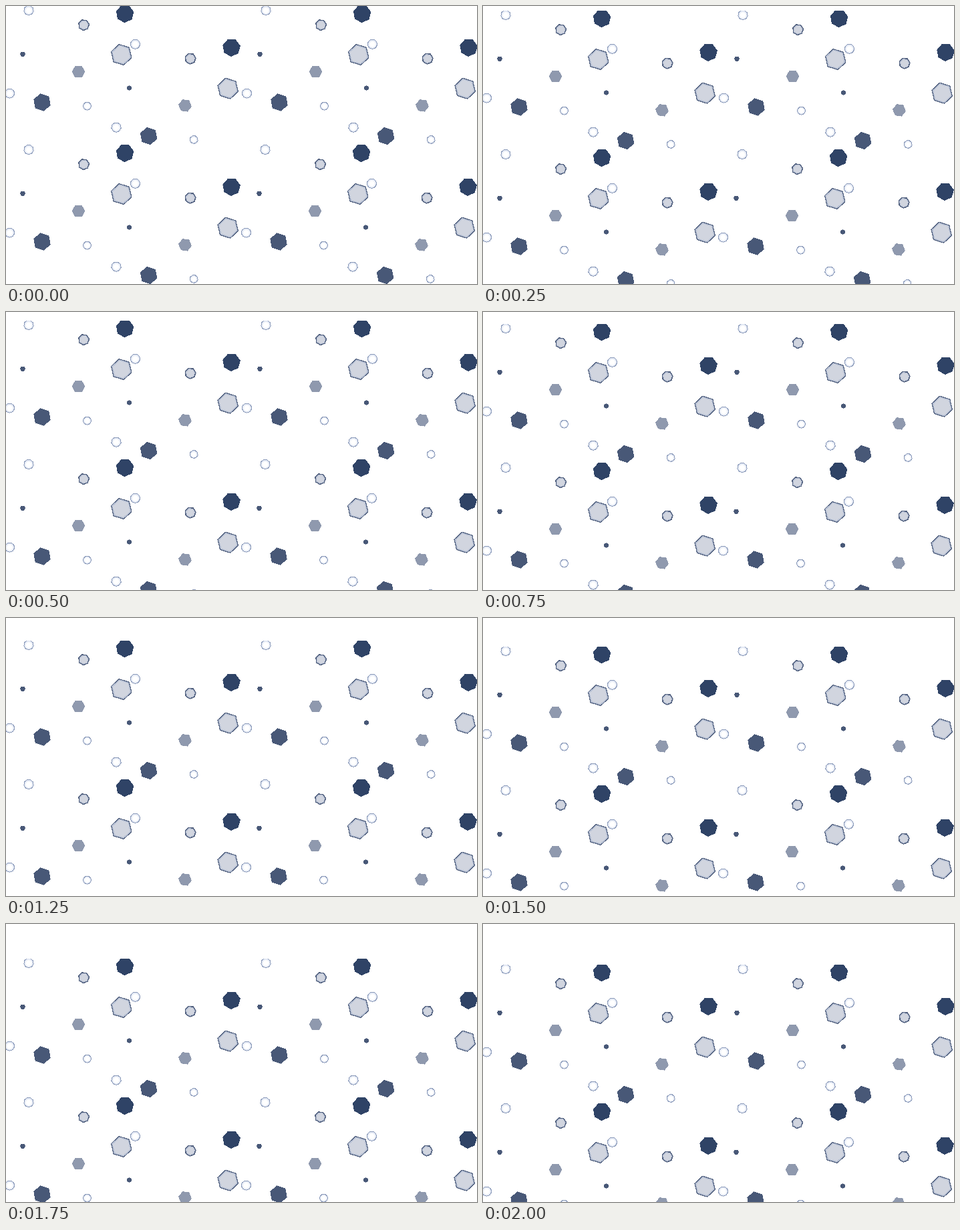
Recreate the animation shown at these times as an HTML page. Size 705 px wide and 417 px high, loop 2250 ms.

```html
<!DOCTYPE html>
<html lang="en">
<head>
<meta charset="utf-8">
<title>Falling hexagons</title>
<style>
  html, body {
    margin: 0;
    width: 100%;
    height: 100%;
    overflow: hidden;
    background: #fff;
  }
  svg {
    display: block;
    width: 100%;
    height: 100%;
    overflow: hidden;
    shape-rendering: crispEdges;
  }
  .sheet {
    clip-path: url(#edge);
    animation: fall 2250ms step-end infinite;
  }
  @keyframes fall {
    0% { transform: translateY(0); }
    11.1111% { transform: translateY(7px); }
    22.2222% { transform: translateY(13px); }
    33.3333% { transform: translateY(18px); }
    44.4444% { transform: translateY(26px); }
    55.5555% { transform: translateY(34px); }
    66.6666% { transform: translateY(43px); }
    77.7777% { transform: translateY(52px); }
    88.8888%, 100% { transform: translateY(61px); }
  }
  .navy { fill: #2f4366; }
  .slate { fill: #485877; }
  .gray { fill: #8f99ae; }
  .rim { fill: #52617f; }
  .bevel { fill: #b4bed2; }
  .face { fill: #d1d5df; }
  .ring { fill: url(#glow); stroke: #8c9bba; stroke-width: 1; }
</style>
</head>
<body>
<svg viewBox="0 0 705 417" preserveAspectRatio="xMinYMin slice">
  <defs>
    <clipPath id="edge"><rect width="705" height="417"/></clipPath>
    <radialGradient id="glow">
      <stop offset="0.5" stop-color="#fff"/>
      <stop offset="1" stop-color="#d3dcee"/>
    </radialGradient>
    <g id="tile"></g>
  </defs>
  <g class="sheet">
    <use href="#tile"/>
    <use href="#tile" x="355"/>
    <use href="#tile" y="209"/>
    <use href="#tile" x="354" y="209"/>
  </g>
</svg>
<script>
  const tile = document.getElementById('tile');

  function polygon(cls, x, y, r, turn, sides = 6) {
    const el = document.createElementNS('http://www.w3.org/2000/svg', 'polygon');
    const points = Array.from({ length: sides }, (_, i) => {
      const a = (turn + i * 360 / sides) * Math.PI / 180;
      return (x + r * Math.cos(a)).toFixed(2) + ',' + (y + r * Math.sin(a)).toFixed(2);
    });
    el.setAttribute('points', points.join(' '));
    el.setAttribute('class', cls);
    tile.append(el);
  }

  function gem(x, y, r, turn, sides, rim, bevel) {
    polygon('rim', x, y, r, turn, sides);
    polygon('bevel', x, y, r - rim, turn, sides);
    polygon('face', x, y, r - rim - bevel, turn, sides);
  }

  const navy = (x, y) => polygon('navy', x, y, 13.6, -62, 7);
  const slate = (x, y) => polygon('slate', x, y, 13.5, -101);
  const gray = (x, y, turn) => polygon('gray', x, y, 10, turn);
  const dot = (x, y) => polygon('slate', x, y, 3.9, 0, 8);
  const ring = (x, y, r) => polygon('ring', x, y, r, 10, 9);
  const bigGem = (x, y) => gem(x, y, 16.6, -103, 6, 1.4, 1.8);
  const smallGem = (x, y) => gem(x, y, 8.8, -110, 7, 1.5, 1.3);

  ring(34, 6.5, 7.3);
  ring(193.5, 57.2, 7.3);
  ring(5.5, 131, 7.3);
  ring(165, 182, 7.3);
  ring(121.5, 150, 6.1);
  ring(281.2, 200.5, 6);
  smallGem(116.5, 28.5);
  smallGem(276, 79);
  navy(178, 11.5);
  navy(337.5, 62.3);
  bigGem(172.7, 73);
  bigGem(332.2, 123.7);
  dot(25, 72.3);
  dot(184.5, 123);
  gray(108.5, 98.6, 0);
  gray(268, 149.4, 8);
  slate(54, 144.5);
  slate(213.6, 195);
</script>
</body>
</html>
```
